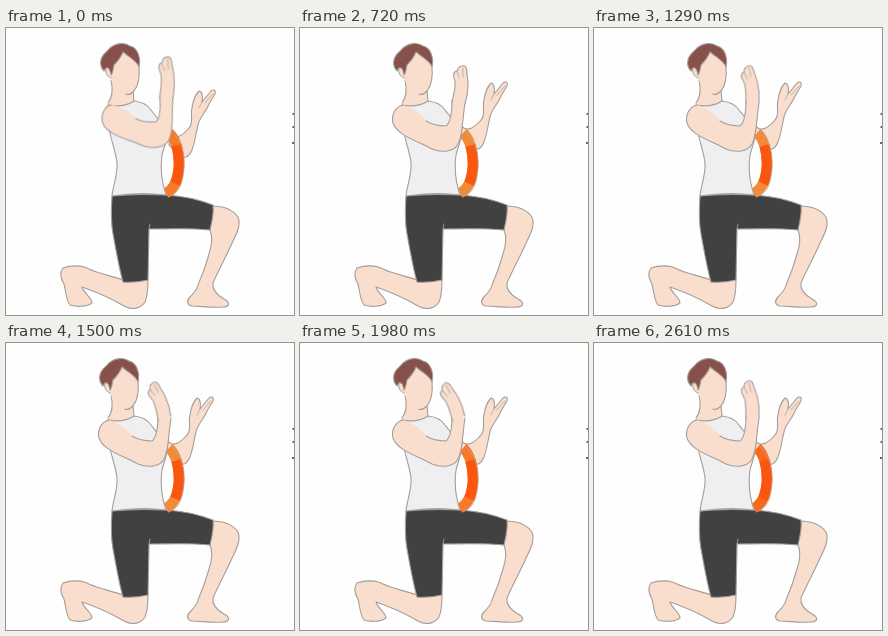
Animation of 288 by 287 pixels, one loop 2.64 s. Source, as an HTML page:

```html
<!DOCTYPE html>
<html lang="en">
<head>
<meta charset="utf-8">
<title>Kneeling wrist exercise</title>
<style>
html, body { margin: 0; width: 100%; height: 100%; overflow: hidden; background: #fefefe; }
svg { display: block; width: 288px; height: 287px; }
.skin { fill: #f9ddcd; }
.hair { fill: #87504a; }
.shirt { fill: #efeff1; }
.shorts { fill: #414141; }
.line { stroke: #a59e9a; stroke-width: 1.1; stroke-linejoin: round; stroke-linecap: round; }
.crease { fill: none; stroke: #b8a89f; stroke-width: .8; stroke-linecap: round; }
.open { fill: none; }
.band { fill: none; stroke-width: 10.5; }
#nearArm { transform-origin: 100px 85px; }
#hand { transform-origin: 159px 75px; }
</style>
</head>
<body>
<svg viewBox="0 0 288 287">
  <g id="legs">
    <path class="skin line" d="M206 178C217 178 227 182 232 189C235 197 231 205 227 213C221 227 212 243 207 255C206 262 211 267 218 271C224 274 225 279 216 279C206 280 195 278 186 278C181 277 180 273 184 269C188 265 191 262 192 257C196 248 200 237 203 226C206 217 207 209 204 202Z"/>
    <path class="skin line" d="M117 252C105 248 91 245 83 241C76 237 65 237 57 240C53 245 55 251 58 256C60 264 60 272 64 277C70 279 81 279 86 275C86 269 78 266 76 259C91 264 106 271 118 278C127 283 135 280 139 274C142 268 142 260 142 251Z"/>
    <path class="shorts line" d="M106 168C124 166 143 166 160 167C178 168 194 172 207 177C208 185 206 194 204 202C184 200 163 201 143 201L142 252Q129 255 117 254C113 240 110 222 107 206C105 195 105 182 106 168Z"/>
    <path class="crease" d="M143 201L144 196"/>
  </g>

  <g id="farArm">
    <path class="skin line" d="M162 98C167 105 175 99 181 92C186 87 182 78 184 72C185 65 187 59 191 55C194 55 195 60 194 66L203 55C206 53 208 54 207 58L201 68C198 76 191 82 190 89C188 97 187 106 184 114C181 121 177 123 172 120L161 109Z"/>
    <path class="crease" d="M194 66L191 72M205 58L197 67"/>
  </g>

  <path class="band" id="bandEnds" stroke="#f38a38" d="M163 105C170 111 173 123 173 138C172 151 169 161 160 165"/>
  <path class="band" stroke="#fb560d" pathLength="100" stroke-dasharray="0 22 58 100" d="M163 105C170 111 173 123 173 138C172 151 169 161 160 165"/>
  <path class="crease" d="M166 104C175 112 179 124 178 140C177 154 174 165 164 168"/>

  <path class="skin" d="M105 46C107 58 106 69 102 75L98 81L118 100L135 80L128 73L127 60Z"/>
  <path class="line open" d="M105 52C107 61 106 70 102 75M127 62L128 73"/>
  <path class="shirt line" d="M102 77C113 79 122 77 128 73C136 74 142 77 145 82L160 101C163 110 158 118 156 127C154 141 156 155 160 167C144 165 124 165 106 168C107 157 112 146 111 135C110 125 106 115 104 105Z"/>

  <g id="nearArm">
    <path class="skin" d="M103 77C95 79 91 87 93 95C97 107 115 112 132 121C142 125 154 124 158 116C163 107 162 94 165 75L152 72C152 84 151 94 146 98C138 98 131 96 126 93C122 87 115 81 103 77Z"/>
    <path class="line open" d="M103 77C95 79 91 87 93 95C97 107 115 112 132 121C142 125 154 124 158 116C163 107 162 94 165 75M152 72C152 84 151 94 146 98C138 98 131 96 126 93"/>
    <g id="hand">
      <path class="skin line" d="M152 75C153 67 156 60 155 53C153 48 153 43 157 43C158 40 159 38 162 38C166 37 167 40 167 46C169 56 168 66 165 76"/>
      <path class="crease" d="M157 43L159 50M163 40L163 49"/>
    </g>
  </g>

  <g id="head">
    <path class="skin" d="M101 39C98 41 99 47 104 49C106 57 112 65 120 67C128 65 133 55 132 40L129 28L116 20L104 34Z"/>
    <path class="line open" d="M99 40C98 44 100 48 104 50M132 38C133 49 131 58 127 63C124 66 121 67 119 66"/>
    <path class="hair line" d="M132 39C130 33 123 30 116 24C114 29 111 33 107 37C106 41 106 45 104 47C103 42 102 39 99 40L97 43C94 40 93 36 94 32C95 26 100 24 103 20C109 15 117 14 123 18C131 20 134 30 132 39Z"/>
  </g>

  <path d="M286.500 86H288M286.500 99H288M286 115H288" stroke="#333" stroke-width="1.4"/>
</svg>
<script>
const LOOP = 2640;

// Each step is [time in ms, value].
function play(id, prop, steps, easing = "linear") {
  const keys = steps.map(([t, v]) => ({ offset: t / LOOP, [prop]: v, easing }));
  document.getElementById(id).animate(keys, { duration: LOOP, iterations: Infinity });
}

const pose = (x, y, deg = 0) => `translate(${x}px, ${y}px) rotate(${deg}deg)`;
const bend = (deg, size = 1) => `rotate(${deg}deg) scale(1, ${size})`;

play("nearArm", "transform",
  [[0, pose(3, 0, -5)], [300, pose(0, 0)], [LOOP, pose(0, 0)]], "ease-out");
play("farArm", "transform",
  [[0, pose(2, 8)], [300, pose(0, 0)], [LOOP, pose(0, 0)]], "ease-out");
play("head", "transform",
  [[0, pose(1, 0)], [300, pose(0, 0)], [LOOP, pose(0, 0)]], "ease-out");
play("hand", "transform", [
  [0, bend(0, 1.1)], [360, bend(-13)], [720, bend(0)], [1290, bend(-13)],
  [1710, bend(-35)], [2280, bend(-20)], [LOOP, bend(-13)]
], "ease-in-out");
play("bandEnds", "stroke", [
  [0, "#f67a28"], [360, "#f38a38"], [1710, "#f38a38"],
  [2280, "#fa691b"], [LOOP, "#fa691b"]
]);
</script>
</body>
</html>
```
